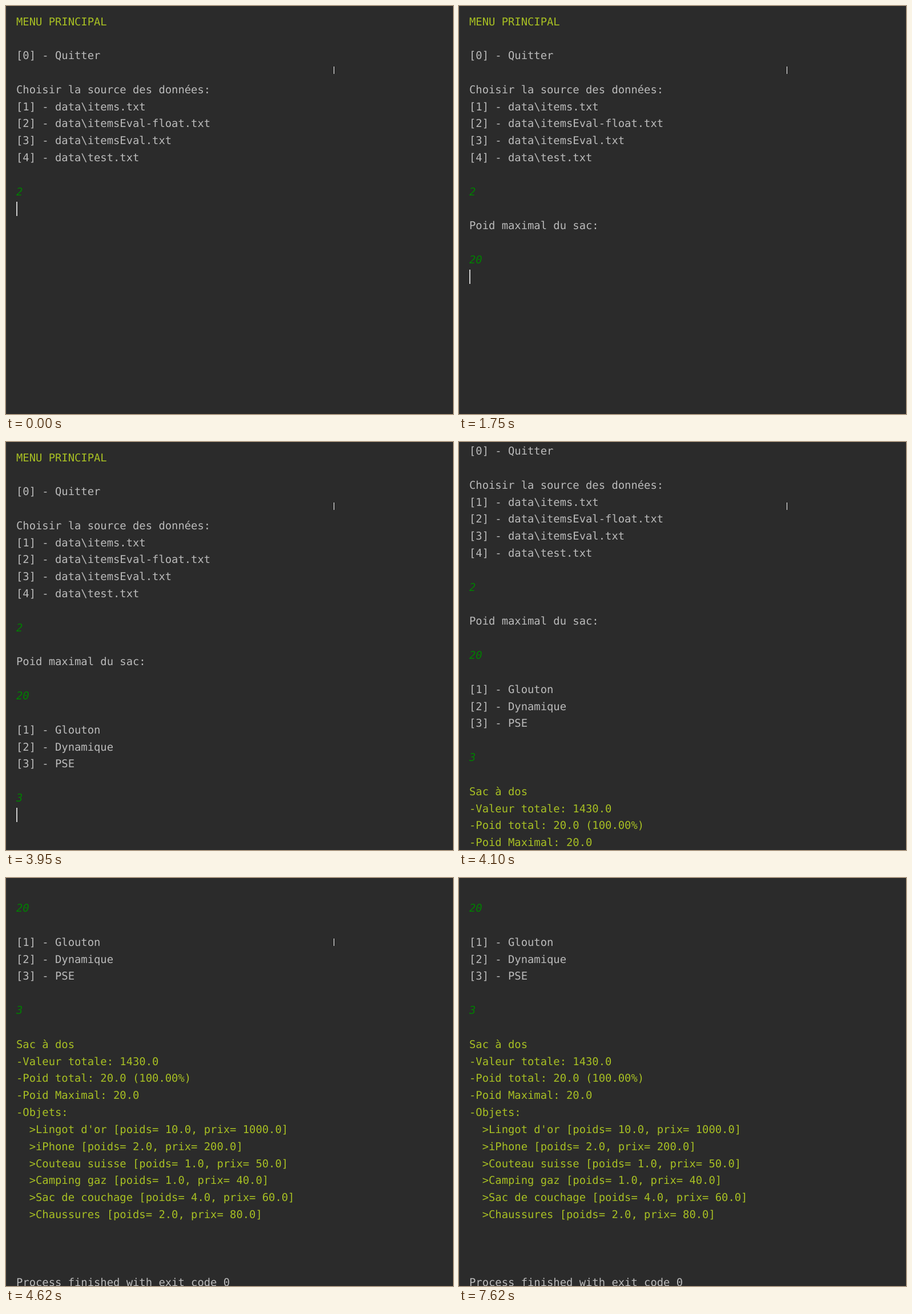
Animation of 783x715 px, one loop 7.74 s. Source, as an HTML page:

```html
<!DOCTYPE html>
<html lang="fr">
<head>
<meta charset="utf-8">
<title>Menu principal</title>
<style>
  html, body { margin: 0; width: 100%; height: 100%; overflow: hidden; background: #2b2b2b; }
  svg { display: block; }
  text {
    font: 18.83px "DejaVu Sans Mono", monospace;
    fill: #bbb;
    white-space: pre;
    text-rendering: geometricPrecision;
  }
  .result { fill: #a8c023; }
  .input { fill: #007f00; font-style: italic; }
</style>
</head>
<body>
<svg width="783" height="715" viewBox="0 0 783 715">
  <rect width="783" height="715" fill="#2b2b2b"/>
  <rect width="1.5" height="715" fill="#313335"/>
  <g id="console"></g>
  <rect id="pointer" width="1" height="13" fill="#fff"/>
</svg>
<script>
const LOOP = 7740, HEIGHT = 715, LEFT = 18, ROW = 29.83, CHAR = 11.337;
const KEY_GAP = 120, POINTER_GAP = 127;

const group = document.getElementById("console");
const pointer = document.getElementById("pointer");
const lines = [];

const baseline = row => Math.floor(34 + row * ROW);

function add(tag, attrs) {
  const el = document.createElementNS("http://www.w3.org/2000/svg", tag);
  for (const key in attrs) el.setAttribute(key, attrs[key]);
  return group.appendChild(el);
}

function addLine(text, tone, timing) {
  const el = add("text", { x: LEFT, y: baseline(lines.length), class: tone });
  lines.push({ text, el, overscroll: 0, ...timing });
}

// Prints a block of lines at once.
function say(at, block, tone = "plain", overscroll = 0) {
  for (const text of block.split("\n")) {
    addLine(text, tone, { at, done: at, gap: 0, overscroll });
  }
}

// The caret blinks off, then the text is typed and entered.
function type(blink, at, done, text) {
  addLine(text, "input", { blink, at, done, gap: KEY_GAP });
}

say(0, "MENU PRINCIPAL", "result");
say(0, `
[0] - Quitter

Choisir la source des données:
[1] - data\\items.txt
[2] - data\\itemsEval-float.txt
[3] - data\\itemsEval.txt
[4] - data\\test.txt
`);
type(0, 0, 0, "2");
say(280, "\nPoid maximal du sac:\n");
type(980, 1230, 1750, "20");
say(2000, `
[1] - Glouton
[2] - Dynamique
[3] - PSE
`);
type(2990, 3110, 3950, "3");
say(4100, `
Sac à dos
-Valeur totale: 1430.0
-Poid total: 20.0 (100.00%)
-Poid Maximal: 20.0`, "result", 7);
say(4220, `-Objets:
  >Lingot d'or [poids= 10.0, prix= 1000.0]
  >iPhone [poids= 2.0, prix= 200.0]
  >Couteau suisse [poids= 1.0, prix= 50.0]
  >Camping gaz [poids= 1.0, prix= 40.0]
  >Sac de couchage [poids= 4.0, prix= 60.0]
  >Chaussures [poids= 2.0, prix= 80.0]

`, "result");
say(4620, "\nProcess finished with exit code 0");

const caret = add("rect", { width: 2, height: 25, fill: "#ccc" });

function shownText({ text, at, gap }, t) {
  if (t < at) return "";
  return gap ? text.slice(0, 1 + Math.floor((t - at) / gap)) : text;
}

function drawConsole(t) {
  for (const line of lines) {
    const shown = shownText(line, t);
    if (line.el.textContent !== shown) line.el.textContent = shown;
  }
  const rows = lines.filter(line => line.done <= t).length;
  const { overscroll } = lines[rows - 1];
  const scroll = Math.max(0, Math.floor(rows * ROW + 3.5 - HEIGHT + overscroll));
  group.setAttribute("transform", `translate(0 ${-scroll})`);

  const typed = rows < lines.length ? shownText(lines[rows], t).length : 0;
  const blinkedOff = lines.some(({ blink, at }) => blink <= t && t < at);
  caret.setAttribute("x", LEFT + Math.round(typed * CHAR));
  caret.setAttribute("y", baseline(rows) - 19);
  caret.setAttribute("visibility", blinkedOff ? "hidden" : "visible");
}

// The mouse sweeps down to the left in five jumps, then leaves.
function drawPointer(t) {
  const jumps = Math.floor((t - 6960) / POINTER_GAP) + 1;
  const p = Math.min(1, Math.max(0, jumps / 5));
  pointer.setAttribute("x", Math.round(574 - 149 * p));
  pointer.setAttribute("y", Math.round(106 + 213 * (1 - (1 - p) ** 2.5)));
  pointer.setAttribute("visibility", t < 7620 ? "visible" : "hidden");
}

const start = performance.now();
function tick() {
  const t = (performance.now() - start) % LOOP;
  drawConsole(t);
  drawPointer(t);
  requestAnimationFrame(tick);
}
tick();
</script>
</body>
</html>
```
